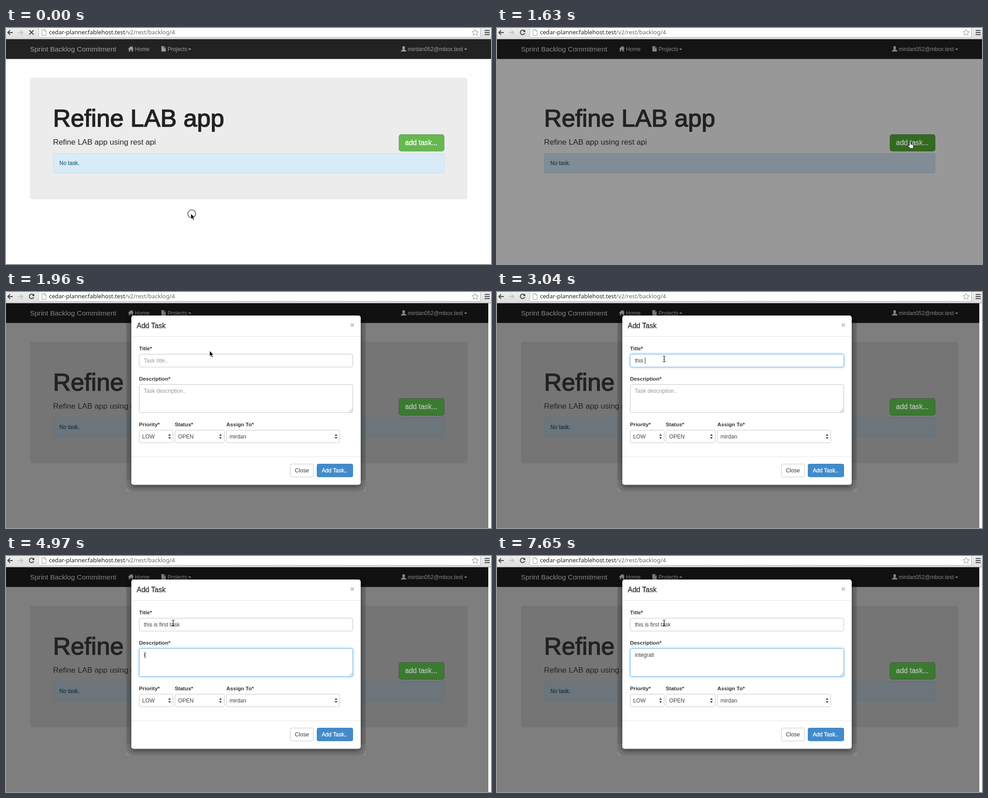
Write an HTML page that moves like this. It is 1072x522 px and loops after 8000 ms.

```html
<!DOCTYPE html>
<html lang="en">
<head>
<meta charset="utf-8">
<title>Add a task</title>
<style>
  html, body { margin: 0; width: 100%; height: 100%; overflow: hidden; background: #fefefe; }
  svg { display: block; width: 1072px; height: 522px; }
  text { font: 12.1px "Liberation Sans", Arial, sans-serif; fill: currentColor; white-space: pre; }
  .medium { stroke: currentColor; stroke-width: .35px; }
  .bold { font-weight: bold; font-size: 11.8px; }
  .url { font: 12.8px "Noto Sans", "Open Sans", sans-serif; }
  .field { fill: #fff; stroke: #c4c4c4; }
  .focused { stroke: #66afe9; filter: drop-shadow(0 0 3px rgba(102, 175, 233, .6)); }
  .modal-shadow { filter: drop-shadow(0 4px 6px rgba(0, 0, 0, .5)); }
</style>
</head>
<body>
<svg viewBox="0 0 1072 522">
  <defs>
    <linearGradient id="chromeFill" x2="0" y2="1">
      <stop stop-color="#eee"/><stop offset="1" stop-color="#dcdcdc"/>
    </linearGradient>
    <path id="caretDown" d="M0 0h7l-3.5 3.5z"/>
    <path id="sorter" d="M-3 -1.5h6l-3 -4zM-3 1.5h6l-3 4z" fill="#444"/>
  </defs>

  <!-- Page -->
  <rect width="1072" height="522" fill="#fefefe"/>
  <rect y="25" width="1072" height="43.500" fill="#222"/>
  <rect id="panel" x="53" y="110" width="967" height="269" rx="5" fill="#ececec"/>
  <rect x="104.500" y="277.500" width="864" height="43.500" rx="3.500" fill="#d9ebf7" stroke="#bce8f1"/>
  <text class="medium" x="118" y="303" color="#31708f">No task.</text>
  <rect id="backdrop" y="25" width="1072" height="497"/>
  <text class="medium" x="104" y="218" color="#222" style="font-size:54px;stroke-width:1.6px">Refine LAB app</text>
  <text x="104" y="258" color="#222" style="font-size:17.2px">Refine LAB app using rest api</text>

  <g id="button">
    <rect x="868.500" y="235.500" width="100" height="37" rx="5" stroke="#000" stroke-opacity=".25"/>
    <text class="medium" x="882" y="259" style="font-size:15.600px">add task...</text>
  </g>

  <!-- Navigation -->
  <g id="nav" color="#9d9d9d" fill="#9d9d9d">
    <text x="53" y="52" style="font-size:15.400px">Sprint Backlog Commitment</text>
    <path d="M269.500 46.500l6.500-6.500 2.500 2.500v-2h2v4l2 2h-2v5.500h-3v-4h-3v4h-3v-5.500z"/>
    <text x="285" y="51">Home</text>
    <path d="M343.500 40h5v4.500h4.500v7.500h-9.500zM349.500 40l3.500 3.500h-3.500z"/>
    <text x="357" y="51">Projects</text>
    <use href="#caretDown" x="402.500" y="45.500"/>
    <path d="M876 43.500a3 3.500 0 0 1 6 0q0 2-1.500 4l4.500 2.500v2h-12v-2l4.500-2.500q-1.500-2-1.500-4z"/>
    <text x="888" y="51">mirdan052@mbox.test</text>
    <use href="#caretDown" x="1012.500" y="45.500"/>
  </g>

  <!-- Dialog -->
  <g id="modal" color="#444">
    <path d="M266 415h529v26h-529z" fill="#8b8b8b"/>
    <rect x="266" y="48" width="529" height="393" rx="14" fill="#000" fill-opacity=".14"/>
    <rect class="modal-shadow" x="277" y="52" width="507" height="374.500" rx="5" fill="#fff"/>
    <path d="M277 98.500h507M277 364.500h507" stroke="#e5e5e5"/>
    <text class="medium" x="289" y="80" color="#333" style="font-size:15.600px">Add Task</text>
    <path d="M762 69.500l7 7m0-7l-7 7" stroke="#bbb" stroke-width="2"/>

    <g color="#333">
      <text class="bold" x="294" y="129">Title*</text>
      <text class="bold" x="294" y="196">Description*</text>
      <text class="bold" x="294" y="297">Priority*</text>
      <text class="bold" x="373" y="297">Status*</text>
      <text class="bold" x="487" y="297">Assign To*</text>
    </g>
    <rect id="titleBox" class="field" x="294.500" y="137.500" width="472" height="28.500" rx="3"/>
    <rect id="noteBox" class="field" x="294.500" y="204.500" width="472" height="62" rx="3"/>
    <path d="M758.500 265.500l7-7m-3 7l3-3" stroke="#888"/>
    <text id="title" x="304.500" y="156"></text>
    <text id="note" x="304.500" y="223"></text>
    <rect id="caret" width="1" height="14" fill="#222"/>

    <rect class="field" x="294.500" y="305.500" width="75" height="28" rx="3"/>
    <rect class="field" x="373.500" y="305.500" width="109" height="28" rx="3"/>
    <rect class="field" x="487.500" y="305.500" width="250" height="28" rx="3"/>
    <text x="301" y="324">LOW</text>
    <text x="380.500" y="324">OPEN</text>
    <text x="494" y="324">mirdan</text>
    <use href="#sorter" x="361.500" y="319.500"/>
    <use href="#sorter" x="474" y="319.500"/>
    <use href="#sorter" x="729.500" y="319.500"/>

    <rect class="field" x="628.500" y="380.500" width="51" height="28.500" rx="3"/>
    <text x="638.500" y="399" color="#333">Close</text>
    <rect x="687.500" y="380.500" width="79" height="28.500" rx="3" fill="#428bca" stroke="#357ebd"/>
    <text class="medium" x="698" y="399" color="#fff">Add Task..</text>
  </g>
  <rect id="scrollbar" x="1066" y="25" width="6" height="497" fill="#f8f8f8"/>

  <!-- Browser toolbar -->
  <rect width="1072" height="25" fill="url(#chromeFill)"/>
  <path d="M0 24.500h1072" stroke="#999"/>
  <rect x="72.500" y="-5" width="976" height="25.500" rx="3" fill="#fff" stroke="#b8b8b8"/>
  <g fill="none" stroke="#444" stroke-width="2">
    <path d="M15 10h-11m5-5l-5 5 5 5"/>
    <path d="M26 10h11m-5-5l5 5-5 5" stroke="#c4c4c4"/>
    <path id="stopIcon" d="M51.500 5l9.500 9.500m0-9.500l-9.500 9.500"/>
    <g id="reloadIcon">
      <path d="M60.500 6.500a5 5 0 1 0 .7 5"/>
      <path d="M62.500 3.500v5.500h-5.500z" fill="#444" stroke="none"/>
    </g>
    <path d="M1058 5.500h11m-11 4.500h11m-11 4.500h11"/>
    <path d="M79.500 3.500h6l3.500 3.500v9.500h-9.500zM85.500 3.500v3.500h3.500" stroke="#999" stroke-width="1"/>
    <path d="M1037 3l2 4.700 5.200.4-4 3.400 1.300 5-4.500-2.700-4.500 2.700 1.300-5-4-3.400 5.200-.4z" stroke="#888" stroke-width="1"/>
  </g>
  <text class="url" x="95" y="14" color="#222">cedar-planner.fablehost.test<tspan fill="#6a6a6a">/v2/rest/backlog/4</tspan></text>

  <!-- Pointer -->
  <circle id="ring" cx="410.500" cy="411" fill="none" stroke="#222" stroke-width="1.200"/>
  <g id="pointer">
    <path id="arrow" d="M0 0v12.500l3-2.700 2.200 5 2.300-1-2.200-4.800h4z" stroke="#fff"/>
    <path id="hand" d="M-1.500 1q1.500-2 3 0v5l5 1.200q1.700.6 1.300 2.800l-1 5.500h-6.500l-5-6q0-2 2-1l1.200 1z" fill="#fff" stroke="#111"/>
    <path id="beam" d="M-3 -6.500q3 0 3 2 0-2 3-2M0 -5v10M-3 6.500q3 0 3-2 0 2 3 2M-1.500 1h3" fill="none" stroke="#222" stroke-width="1.200"/>
  </g>
</svg>

<script>
const LOOP = 8000;
const TITLE = "this is first task";
const NOTE = "integratio";

// Each track holds [start time, value...] steps.
const pointerTrack = [
  [0, "arrow", 408.5, 410.5], [880, "arrow", 450, 397], [1030, "arrow", 590, 352],
  [1180, "arrow", 745, 303], [1330, "arrow", 860, 267], [1480, "hand", 913, 251],
  [1780, "arrow", 622.5, 107], [1960, "arrow", 450, 130], [2110, "beam", 369.5, 148]
];
const ringTrack = [[0, 8.7], [140, 6.5], [290, 4.2], [440, 2], [590, 0]];
const titleTrack = [
  [0, 0], [2410, 1], [2580, 2], [2730, 3], [2890, 4], [3040, 5], [3190, 6], [3340, 8],
  [3480, 9], [3630, 10], [3780, 12], [3930, 13], [4080, 15], [4230, 16], [4380, 17], [4530, 18]
];
const noteTrack = [
  [0, 0], [4970, 1], [5110, 3], [5260, 4], [5410, 5], [5560, 6], [5710, 7],
  [5860, 9], [6010, 10], [7050, 9]
];
const focusTrack = [[0, ""], [2260, "title"], [4830, "note"]];
const caretTrack = [[0, false], [2260, true], [6450, false], [7050, true], [7650, false]];
const dimTrack = [[0, 0], [1630, 0.405], [1780, 0.5]];
const modalTrack = [[0, 0, 0], [1780, 0.65, -48], [1960, 1, 0]];

const el = id => document.getElementById(id);
const at = (track, time) => track.findLast(step => step[0] <= time).slice(1);
const show = (id, visible) => el(id).setAttribute("visibility", visible ? "visible" : "hidden");

function attrs(id, values) {
  for (const name in values) el(id).setAttribute(name, values[name]);
}

function drawField(id, typed, placeholder, focused) {
  el(id).textContent = typed || placeholder;
  attrs(id, { color: typed ? "#444" : "#999" });
  el(id + "Box").classList.toggle("focused", focused);
}

function drawForm(time) {
  const [focus] = at(focusTrack, time);
  const title = TITLE.slice(0, at(titleTrack, time)[0]);
  const note = NOTE.slice(0, at(noteTrack, time)[0]);
  drawField("title", title, "Task title..", focus === "title");
  drawField("note", note, "Task description..", focus === "note");

  const caretOn = at(caretTrack, time)[0] && focus;
  el("caret").style.display = caretOn ? "" : "none";
  if (caretOn) {
    const typed = focus === "title" ? title : note;
    const width = typed ? el(focus).getComputedTextLength() : 0;
    attrs("caret", { x: Math.round(304.5 + width), y: focus === "title" ? 145 : 212 });
  }
}

function drawPage(time) {
  const [dim] = at(dimTrack, time);
  const hover = time >= 1480 && time < 1780;
  attrs("backdrop", { opacity: dim });
  attrs("nav", { opacity: dim ? 0.82 : 1 });
  show("panel", !dim || time >= 1780);
  show("scrollbar", time >= 1780);
  attrs("button", {
    fill: dim ? (hover ? "#326a20" : "#3b7a31") : (hover ? "#4ca131" : "#65b84e"),
    color: dim ? "#bdbdbd" : "#fff"
  });
  show("stopIcon", time < 290);
  show("reloadIcon", time >= 290);
}

function drawPointer(time) {
  const [shape, x, y] = at(pointerTrack, time);
  attrs("pointer", { transform: `translate(${x} ${y})` });
  for (const name of ["arrow", "hand", "beam"]) show(name, name === shape);
  attrs("ring", { r: at(ringTrack, time)[0] });
}

function frame(now) {
  const time = now % LOOP;
  const [opacity, offset] = at(modalTrack, time);
  attrs("modal", { opacity, transform: `translate(0 ${offset})` });
  drawPage(time);
  drawForm(time);
  drawPointer(time);
  requestAnimationFrame(frame);
}
frame(performance.now());
</script>
</body>
</html>
```
